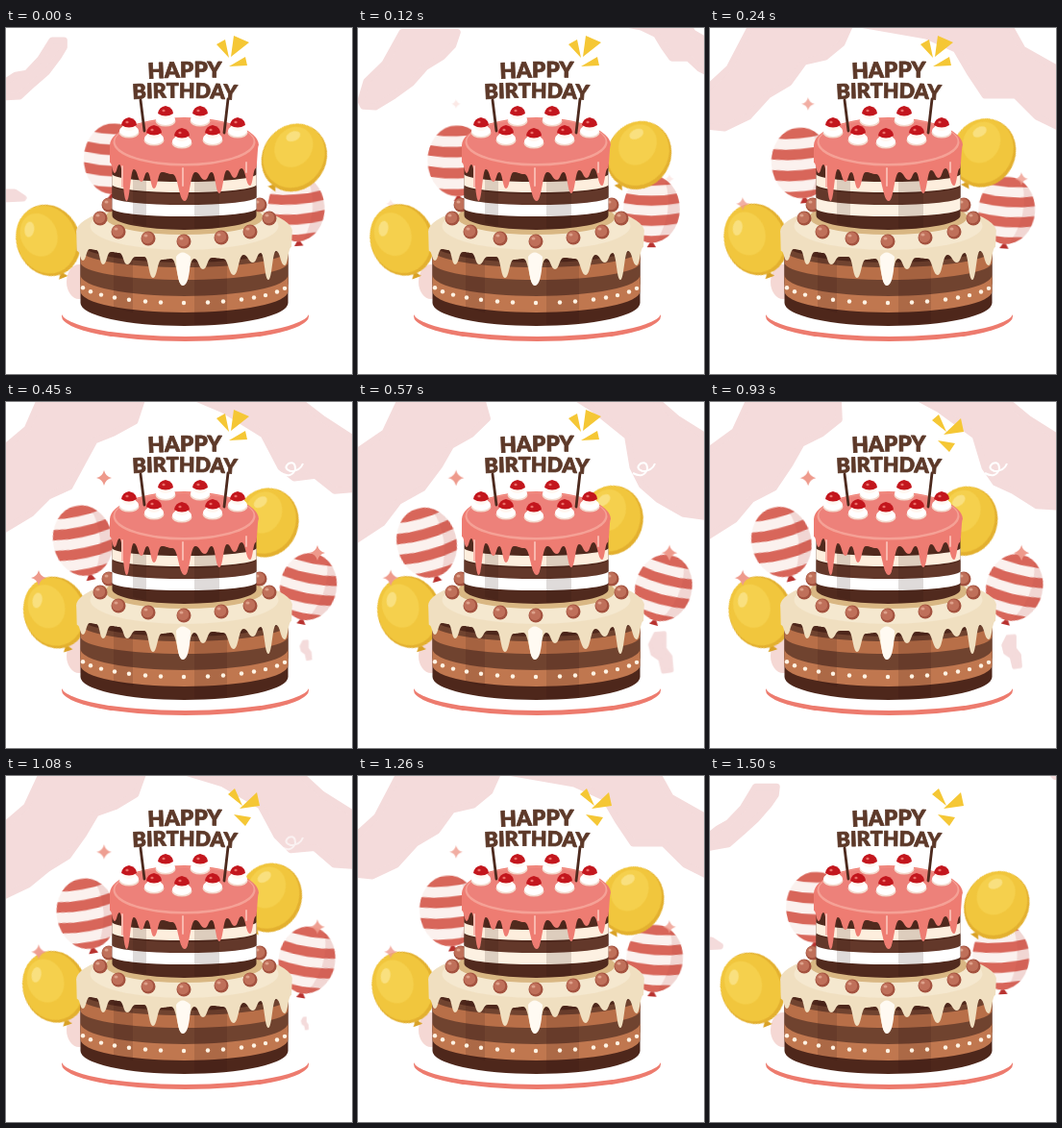
An HTML page that plays this animation: 360 px wide and 360 px high, repeating every 1530 ms.

```html
<!DOCTYPE html>
<html lang="en">
<head>
<meta charset="utf-8">
<title>Birthday cake</title>
<style>
html, body { margin: 0; width: 100%; height: 100%; overflow: hidden; background: #fff; }
svg { display: block; width: 100vw; height: 100vh; }
.move { animation: 1530ms linear infinite; }
.cloud { fill: #f4dbdb; stroke: #f4dbdb; stroke-width: 7; stroke-linejoin: round; }
.msg { font: 900 22.5px Lato, sans-serif; fill: #5d3929; stroke: #5d3929; stroke-width: .7; stroke-linejoin: round; text-anchor: middle; }

#redL { animation-name: redL; }
#redR { animation-name: redR; }
#yelL { animation-name: yelL; }
#yelR { animation-name: yelR; }
@keyframes redL {
  0%, 100% { transform: translate(112px, 136px) rotate(2deg); }
  47% { transform: translate(61px, 149px) rotate(-20deg); }
}
@keyframes redR {
  0%, 100% { transform: translate(302px, 187px) rotate(-4deg); }
  47% { transform: translate(322px, 195px) rotate(20deg); }
}
@keyframes yelL {
  0%, 100% { transform: translate(44px, 221px) rotate(-22deg); }
  47% { transform: translate(56px, 218px) rotate(-16deg); }
}
@keyframes yelR {
  0%, 100% { transform: translate(300px, 135px) rotate(36deg); }
  47% { transform: translate(254px, 120px) rotate(14deg); }
}

#cloudL { animation-name: cloudL; }
#cloudR { animation-name: cloudR; }
#wisp { animation-name: wisp; }
#puff { animation-name: puff; transform-origin: 309px 256px; }
@keyframes cloudL {
  0%, 100% { d: path("M48 13L60 13L60 20L54 30L42 46L28 58L14 71L-4 72L-4 58L10 49L22 47L36 32Z"); }
  15.7%, 82.4% { d: path("M44 -4L146 -4L137 16L120 30L98 35L82 57L60 70L40 92L15 104L-4 102L-4 64L20 42Z"); }
  29.4%, 66.5% { d: path("M36 -4L142 -4L134 20L112 32L92 40L80 62L66 88L44 98L26 116L-4 134L-4 50L22 28Z"); }
  47% { d: path("M56 -4L112 -4L135 14L124 36L102 52L90 72L68 92L40 110L24 138L-4 158L-4 58L36 36Z"); }
}
@keyframes cloudR {
  0%, 100% { d: path("M366 -12L370 -12L372 -12L374 -11L374 -8L372 -8L370 -8L368 -8L367 -8L366 -9L366 -10Z"); }
  15.7%, 82.4% { d: path("M150 -5L310 -5L325 22L364 44L364 104L340 92L318 70L286 70L270 46L256 22L225 8Z"); }
  29.4%, 66.5% { d: path("M195 -5L300 -5L330 18L364 40L364 90L342 92L322 76L300 79L286 68L268 34L226 8Z"); }
  47% { d: path("M264 -5L314 -5L334 16L364 34L364 156L334 146L300 132L290 96L286 68L296 38L268 6Z"); }
}
@keyframes wisp {
  0%, 100% { transform: none; }
  8%, 92% { transform: translateX(-32px); }
}
@keyframes puff {
  0%, 20%, 78%, 100% { transform: scale(0); }
  29.4%, 66.5% { transform: scale(.3); }
  47% { transform: none; }
}

.star { animation-name: star; transform-box: fill-box; transform-origin: center; }
@keyframes star {
  0%, 5%, 95%, 100% { opacity: 0; transform: scale(.5); }
  15.7%, 82.4% { opacity: .8; transform: scale(.85); }
  29.4%, 66.5% { opacity: 1; transform: none; }
  47% { opacity: 1; transform: scale(1.08); }
}
#curl { animation-name: curl; }
@keyframes curl {
  0%, 20%, 78%, 100% { opacity: 0; }
  29%, 66% { opacity: 1; }
}
.rays { animation-timing-function: step-end; }
#raysA { animation-name: raysA; }
#raysB { animation-name: raysB; }
@keyframes raysA { 0% { opacity: 1; } 50%, 100% { opacity: 0; } }
@keyframes raysB { 0% { opacity: 0; } 50%, 100% { opacity: 1; } }
#cream { animation-name: cream; animation-timing-function: step-end; }
@keyframes cream {
  0%, 24%, 90% { fill: #fff; }
  8%, 74% { fill: #fdf1e2; }
  100% { fill: #fff; }
}
</style>
</head>
<body>
<svg viewBox="0 0 360 360">
  <defs>
    <clipPath id="oval"><ellipse rx="31" ry="37"/></clipPath>
    <path id="arc1" d="M126 54Q186 50 246 52"/>
    <path id="arc2" d="M116 75Q186 70 256 76"/>
    <g id="yellow">
      <path d="M-5 42L0 35L5 42Z" fill="#d9a126"/>
      <ellipse rx="33" ry="38" fill="#e3b02f"/>
      <ellipse cx="-1.5" cy="-1.5" rx="31" ry="36" fill="#f1c63d"/>
      <ellipse cx="-7" cy="-9" rx="19" ry="23" fill="#f5d04d"/>
      <ellipse cx="-14" cy="-18" rx="5" ry="8" transform="rotate(30 -14 -18)" fill="#f9e07f"/>
    </g>
    <g id="striped">
      <path d="M-5 42L0 34L5 42Z" fill="#b8322f"/>
      <g clip-path="url(#oval)">
        <path d="M-40 -40H40V40H-40Z" fill="#fbf1ee"/>
        <path id="bars" fill="none" stroke="#d8665a" stroke-width="11"/>
        <path d="M12 -38Q28 0 4 38H40V-38Z" fill="#b84b45" opacity=".16"/>
      </g>
    </g>
  </defs>

  <path id="cloudL" class="cloud move"/>
  <path id="cloudR" class="cloud move"/>
  <path id="wisp" class="cloud move" d="M-4 171H9L18 177L-4 178Z"/>
  <path id="puff" class="cloud move" d="M310 232L325 231L325 257L335 270L337 294L323 296L318 275L305 266L301 250Z"/>
  <path id="curl" class="move" d="M286 74Q297 80 301 70Q301 61 294 64Q288 69 296 72Q306 72 309 64" fill="none" stroke="#fff" stroke-width="2"/>
  <ellipse cx="76" cy="264" rx="13" ry="18" fill="#f5d8d4"/>

  <g id="redL" class="move"><use href="#striped"/></g>
  <g id="redR" class="move"><use href="#striped" transform="scale(.95)"/></g>
  <g id="yelL" class="move"><use href="#yellow"/></g>
  <g id="yelR" class="move"><use href="#yellow" transform="scale(1 .96)"/></g>
  <g id="stars" fill="#ee9a8c"></g>

  <ellipse cx="186.500" cy="300" rx="128.500" ry="26" fill="#ed7b6e"/>
  <ellipse cx="186.500" cy="296" rx="129" ry="25" fill="#fff"/>
  <g id="cake"></g>

  <path d="M140 75L144 107M231 74L227 109" stroke="#4d2a1e" stroke-width="2.800" stroke-linecap="round"/>
  <text class="msg"><textPath href="#arc1" startOffset="50%">HAPPY</textPath></text>
  <text class="msg" style="font-size:21.500px"><textPath href="#arc2" startOffset="50%">BIRTHDAY</textPath></text>

  <g fill="#f5c735">
    <path id="raysA" class="rays move" d="M219 17L228 12L232 31ZM237 8L253 15L234 30ZM232 40L249 30L251 39Z"/>
    <path id="raysB" class="rays move" d="M231 19L238 13L246 31ZM243 34L261 17L264 31ZM237 40L255 43L249 52Z"/>
  </g>
</svg>
<script>
const $ = id => document.getElementById(id);
const CX = 185.5;

const oval = (x, y, rx, ry, fill, extra = '') =>
  `<ellipse cx="${x}" cy="${y}" rx="${rx}" ry="${ry}" fill="${fill}" ${extra}/>`;
const shape = (d, fill, extra = '') => `<path d="${d}" fill="${fill}" ${extra}/>`;

// Curved strip around a cylinder
const band = (rx, ry, y, h, fill, extra) => shape(
  `M${CX - rx} ${y}a${rx} ${ry} 0 0 0 ${2 * rx} 0v${h}a${rx} ${ry} 0 0 1 ${-2 * rx} 0Z`, fill, extra);

// Icing: a rounded top and an edge through alternating tips and hollows
function icing(x, y, rx, ry, edge, fill, extra) {
  let d = `M${x + rx} ${y}A${rx} ${ry} 0 0 0 ${x - rx} ${y}`;
  let px = x - rx, py = y;
  for (const [ex, ey] of edge) {
    const mx = (px + ex) / 2;
    d += `C${mx} ${py} ${mx} ${ey} ${ex} ${ey}`;
    px = ex; py = ey;
  }
  return shape(d + 'Z', fill, extra);
}

const lowEdge = [[74, 232], [80, 242], [87, 230], [94, 231], [101, 246], [109, 233], [118, 234],
  [126, 246], [135, 238], [144, 238], [153, 260], [162, 241], [172, 240], [184, 268], [196, 240],
  [205, 251], [214, 239], [226, 240], [237, 257], [247, 236], [257, 244], [265, 234], [273, 262],
  [281, 232], [290, 247], [297, 228], [298, 210]];
const topEdge = [[108, 140], [113, 151], [118, 142], [125.5, 180], [133, 147], [141, 160], [147, 150],
  [154, 167], [162, 150], [173, 152], [186, 180], [197, 150], [207, 158], [214, 150], [222, 172],
  [230, 148], [238, 156], [245, 146], [254, 164], [260, 146], [263, 122]];

const balls = [[107, 184], [264, 184], [98, 198], [274, 198], [117, 212], [254, 212],
  [148, 219], [224, 218], [185, 222]];
const cherries = [[166, 87], [202, 87], [128, 99], [241, 99], [154, 107], [215, 107], [183, 110]];

const ball = ([x, y]) => oval(x, y, 7.5, 7.5, '#a3523f') + oval(x - .8, y - .8, 6, 6, '#bf705a') +
  oval(x - 2.5, y - 3, 2, 1.6, '#dda08a');
const cherry = ([x, y]) => oval(x, y + 10, 10.5, 5.5, '#f3d9cd') + oval(x, y + 8, 10, 6, '#fff') +
  oval(x, y + 4, 7, 4, '#fff8f2') +
  shape(`M${x} ${y - 6}q8 2 8 8q-8 5 -16 0q1 -7 8 -8Z`, '#c3161d') + oval(x - 2, y - 1, 1.6, 1.2, '#ec6d68');

const dot = x => oval(x, 264 + 22 * Math.sqrt(1 - ((x - CX) / 110) ** 2), 2.2, 2.2, '#fff3e4');
const dots = [80, 88, 99, 113, 128, 145, 161, 185, 210, 226, 245, 258, 270, 282, 290];

$('cake').innerHTML =
  band(108, 24, 212, 74, '#4e271b') +
  band(108, 20, 224, 42, '#70432f') +
  band(108, 18, 231, 13, '#b86f48') +
  band(108, 22, 257, 17, '#c0774f') +
  shape('M196 240h34v66q-18 3 -34 3ZM112 230h20v66q-10 -2 -20 -5Z', '#2b0f08', 'opacity=".13"') +
  dots.map(dot).join('') +
  icing(CX, 212, 112.5, 31, lowEdge, '#f0dfc0') +
  shape('M177 238Q183 229 192 238Q191 268 184 268Q178 268 177 238Z', '#fffaf2') +
  oval(CX, 206, 98, 25, '#f5e8cf') +
  oval(CX, 197, 82, 18, '#d9b783') +
  balls.map(ball).join('') +
  band(75, 15, 120, 75, '#512a1e') +
  band(75, 9, 164, 12, '#63382a') +
  band(75, 8, 152, 11, '#fdeedd') +
  band(75, 8, 176, 12, '#fff', 'id="cream" class="move"') +
  shape('M196 150h26v57q-12 2 -26 2ZM132 150h14v56l-14 -3Z', '#2b0f08', 'opacity=".15"') +
  icing(CX, 122, 77.5, 29, topEdge, '#ee7c72') +
  oval(CX, 119, 74, 24.5, '#f5a196') +
  oval(CX, 118, 72, 23, '#ed817a') +
  shape('M121 144V165M184 146V164M250 140V150', 'none',
    'stroke="#f9b8ae" stroke-width="2" stroke-linecap="round"') +
  cherries.map(cherry).join('');

$('bars').setAttribute('d', [-36, -14, 8, 30].map(y => `M-40 ${y}Q0 ${y + 10} 40 ${y}`).join(''));

$('stars').innerHTML = [[102, 79], [34, 183], [324, 157]].map(([x, y]) =>
  shape(`M${x} ${y - 8}q1.500 6.500 8 8q-6.500 1.500 -8 8q-1.500 -6.500 -8 -8q6.500 -1.500 8 -8Z`,
    'inherit', 'class="star move" style="fill:#ee9a8c"')).join('');
</script>
</body>
</html>
```
